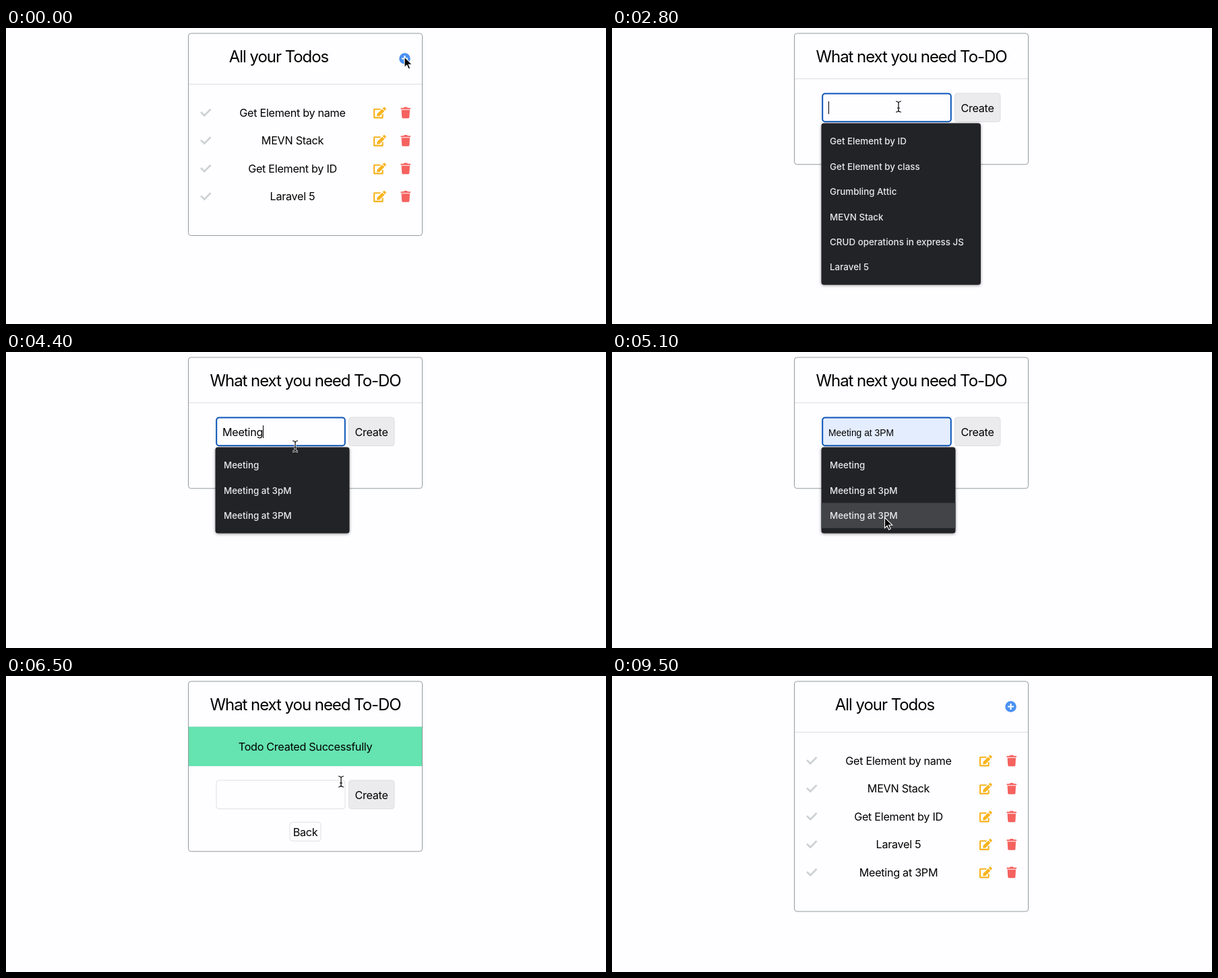
Animation, 890 px wide and 440 px high, one loop 9600 ms. Source, as an HTML page:

```html
<!DOCTYPE html>
<html lang="en">
<head>
<meta charset="utf-8">
<title>Todo list</title>
<style>
  html, body { margin: 0; width: 100%; height: 100%; overflow: hidden; background: #fefdff; }
  svg { display: block; width: 890px; height: 440px; }
  text { font: 16.2px Inter, sans-serif; letter-spacing: -.3px; fill: #000; white-space: pre; }
  .mid { text-anchor: middle; }
  .title { font-size: 24px; letter-spacing: -1.05px; }
  .option { font-size: 13.4px; font-weight: 500; letter-spacing: 0; fill: #e8eaed; }
  .preview { font: 13.87px "Liberation Sans", Arial, sans-serif; letter-spacing: 0; }
  .card { fill: none; stroke: #929b9f; }
  .rule { fill: none; stroke: #dddde0; }
  .menu { fill: #222327; filter: drop-shadow(0 1px 2px rgba(0, 0, 0, .4)); }
</style>
</head>
<body>
<svg viewBox="0 0 890 440">
  <defs>
    <g id="check"><path d="M62 255L192 385 450 127" fill="none" stroke="#cdd1d3" stroke-width="82" stroke-linecap="square"/></g>
    <g id="edit" fill="#f8b41f">
      <path d="M322 96H48Q32 96 32 112V464Q32 480 48 480H400Q416 480 416 464V318" fill="none" stroke="#f8b41f" stroke-width="64"/>
      <path d="M396 77L500 180 274 406 158 418 170 302Z"/>
      <path d="M418 54l48-46q22-16 48 0l50 50q16 24 0 48l-48 48z"/>
    </g>
    <g id="trash" fill="#f5625f">
      <path d="M16 32H136L150 8Q156 0 168 0H280Q292 0 298 8L312 32H432Q448 32 448 48V80Q448 96 432 96H16Q0 96 0 80V48Q0 32 16 32Z"/>
      <path d="M32 128H416L395 467Q392 512 347 512H101Q56 512 53 467Z"/>
    </g>
    <g id="arrow"><path d="M0 0V15.6L3.6 12.2 6.1 18 8.7 16.9 6.2 11.2H11.2Z" stroke="#fff" stroke-width="1.1"/></g>
    <g id="hand">
      <path d="M-1.6 1.2Q-1.4-.3 0-.2 1.2 0 1.5 1.3L2.6 6.2Q4.2 4.9 5.2 6.4 6.9 5.4 7.7 7 9.7 6.3 10.2 8.3 11.4 12 9.5 14.2V17H1.6Q-.5 13.8-3.6 10.9-5.2 9.2-3.9 8.4-2.6 7.8-.3 9.8Z" fill="#fff" stroke="#000" stroke-width="1.1" stroke-linejoin="round"/>
      <path d="M3 11v3.6M5.2 11v3.6M7.4 11v3.6" stroke="#000" stroke-width=".9"/>
    </g>
    <g id="beam" fill="none">
      <path id="stem" d="M-4-8Q0-8 0-5 0-8 4-8M0-5V5M-4 8Q0 8 0 5 0 8 4 8M-2 2H2" stroke="#fff" stroke-width="2.8"/>
      <path d="M-4-8Q0-8 0-5 0-8 4-8M0-5V5M-4 8Q0 8 0 5 0 8 4 8M-2 2H2" stroke="#000" stroke-width="1.2"/>
    </g>
  </defs>
  <g id="stage"></g>
</svg>
<script>
const LOOP = 9600, STEP = 100, ROW = 37.4;
const stage = document.getElementById('stage');

const todos = ['Get Element by name', 'MEVN Stack', 'Get Element by ID', 'Laravel 5', 'Meeting at 3PM'];
const history = ['Get Element by ID', 'Get Element by class', 'Grumbling Attic', 'MEVN Stack',
  'CRUD operations in express JS', 'Laravel 5'];
const meetings = ['Meeting', 'Meeting at 3pM', 'Meeting at 3PM'];
const keyTimes = [3300, 3500, 3600, 3700, 3900, 4000, 4100];

// time, x, y, shape ('' hides the pointer)
const pointer = [
  [0, 591, 43, 'arrow'], [100, 591, 46, 'hand'], [2300, 591, 46, 'hand'],
  [2400, 561, 59, 'arrow'], [2700, 425, 117, 'beam'], [3300, 425, 117, ''],
  [4400, 429, 140, 'beam'], [4500, 427, 158, 'arrow'], [5000, 404.5, 246, 'arrow'],
  [5300, 404.5, 246, 'arrow'], [5900, 540, 118, 'hand'], [6300, 540, 118, 'arrow'],
  [6500, 497, 157, 'beam'], [6700, 474, 193, 'arrow'], [7000, 443, 231, 'hand'],
  [7900, 443, 231, 'arrow'], [8500, 764, 225, 'arrow'], [8600, 764, 225, '']
];

const rect = (x, y, w, h, attrs, r = 4) =>
  `<rect x="${x}" y="${y}" width="${w}" height="${h}" rx="${r}" ${attrs}/>`;
const text = (x, y, value, cls = 'mid') => `<text x="${x}" y="${y}" class="${cls}">${value}</text>`;
const line = y => `<path class="rule" d="M271 ${y}H617"/>`;
const card = bottom => rect(270.5, 8, 347, bottom - 8, 'class="card"');
const use = (id, x, y, scale = 1) =>
  `<use href="#${id}" transform="translate(${x} ${y}) scale(${scale})"/>`;

function pointerAt(t) {
  const i = pointer.findLastIndex(key => key[0] <= t);
  const [t0, x0, y0, shape] = pointer[i];
  const [t1, x1, y1] = pointer[i + 1] || [LOOP, x0, y0];
  const glides = shape && t1 - t0 <= 600;
  const p = glides ? (t - t0) / (t1 - t0) : 0;
  const e = p * p * (3 - 2 * p);
  return { x: x0 + (x1 - x0) * e, y: y0 + (y1 - y0) * e, shape };
}

function listPage(count) {
  const rows = todos.slice(0, count).map((name, i) => {
    const y = 117.6 + 41.5 * i;
    return use('check', 288, y, .0325) + text(425, y + 14.3, name) +
      use('edit', 545, y, .0328) + use('trash', 585.5, y, .0325);
  });
  return card(142.5 + 41.5 * count) + text(404.5, 51, 'All your Todos', 'mid title') + line(83.5) +
    '<circle cx="591.5" cy="45.5" r="8.3" fill="#4a91f2"/>' +
    '<path d="M587 45.5h9M591.5 41v9" stroke="#fff" stroke-width="2.2"/>' + rows.join('');
}

function menu(options, width, hover) {
  const height = 15.8 + ROW * options.length;
  return rect(310.5, 141.5, width, height, 'class="menu"') +
    (hover < 0 ? '' : rect(310.5, 149.6 + ROW * hover, width, ROW, 'fill="#434447"', 0)) +
    options.map((name, i) => text(323, 173.4 + ROW * i, name, 'option')).join('');
}

function formPage(t, mouse) {
  const done = t >= 6300;
  const dy = done ? 58 : 0;
  const focused = t >= 2700 && t < 6100;
  const chosen = t >= 5300 && !done;
  const typed = keyTimes.filter(k => k <= t).length;
  const open = t >= 2800 && t < 5300;
  const hover = t >= 4500 && open ? Math.floor((mouse.y - 149.6) / ROW) : -1;
  const preview = hover >= 0;
  const filled = preview || chosen;
  const value = done ? '' : chosen ? meetings[2] : preview ? meetings[hover] : 'Meeting'.slice(0, typed);
  const pressed = t >= 5900 && !done;

  let out = card(202.8 + dy) + text(444, 51, 'What next you need To-DO', 'mid title') + line(75.5);
  if (done) out += rect(271, 75.5, 346, 58.5, 'fill="#65e3b0"', 0) + text(444, 111, 'Todo Created Successfully');

  const fill = filled ? '#e3edfd' : '#fefdff';
  out += focused
    ? rect(312.2, 97.5, 190.6, 41.8, `fill="${fill}" stroke="#0b55b8" stroke-width="2"`)
    : rect(312, 97 + dy, 191, 42.5, `fill="${fill}" stroke="#dfdfe2"`);
  out += `<text id="value" x="321" y="${preview ? 124.5 : 124.6}" class="${preview ? 'preview' : ''}">${value}</text>`;
  if (focused && !preview && !chosen) out += '<path id="caret" d="M321.5 109v19" stroke="#000"/>';

  out += rect(508.5, 97 + dy, 67.5, 42.5, `fill="${pressed ? '#e3e3e6' : '#ebebed'}" stroke="#dededf"`) +
    text(542, 124.5 + dy, 'Create') +
    rect(421, 159.3 + dy, 46, 28, 'fill="#fefdff" stroke="#dfdfe2"') + text(444, 179.5 + dy, 'Back');

  if (open) {
    if (typed === 0) out += menu(history, 236.5, -1);
    else out += menu(typed < 3 ? ['MEVN Stack', ...meetings] : meetings, 199, hover);
  }
  return out;
}

function draw(t) {
  const mouse = pointerAt(t);
  const page = t < 2100 ? listPage(4) : t < 7900 ? formPage(t, mouse) : listPage(5);
  stage.innerHTML = page + (mouse.shape ? use(mouse.shape, mouse.x, mouse.y) : '');
  const caret = document.getElementById('caret');
  if (caret) {
    const width = document.getElementById('value').getComputedTextLength();
    caret.setAttribute('transform', `translate(${Math.round(width)} 0)`);
  }
}

let start, shown = -1;
function tick(now) {
  start ??= now;
  const t = Math.floor((now - start) % LOOP / STEP) * STEP;
  if (t !== shown) draw(shown = t);
  requestAnimationFrame(tick);
}
requestAnimationFrame(tick);
</script>
</body>
</html>
```
